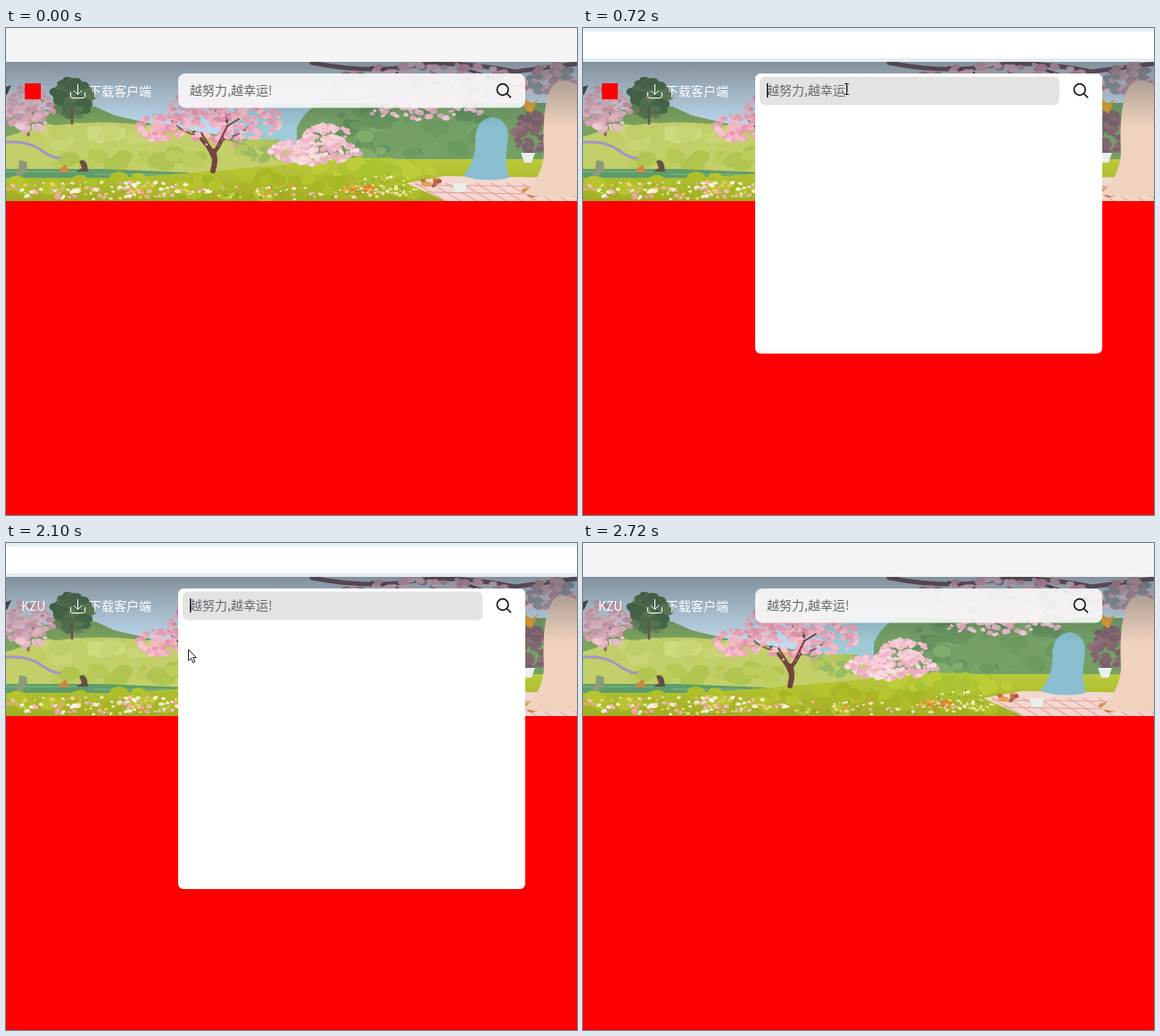
These frames come from a looping animation (640x546 px, 3110 ms). An HTML page with a canvas:

```html
<!DOCTYPE html>
<html lang="zh">
<head>
<meta charset="utf-8">
<style>
html, body { margin: 0; width: 100%; height: 100%; overflow: hidden; background: #f00; }
canvas { display: block; }
</style>
</head>
<body>
<canvas id="stage" width="640" height="546"></canvas>
<script>
const LOOP = 3110;
const STEPS = [0, 60, 200, 320, 460, 580, 720, 840, 960, 1070, 1190, 1300, 1420, 1540,
  1650, 1760, 1880, 1990, 2100, 2220, 2330, 2450, 2560, 2720];
const FONT = '14px "Noto Sans CJK SC", "Noto Sans CJK", sans-serif';
const HINT = '越努力,越幸运!';
const stage = document.getElementById('stage').getContext('2d');
const banner = document.createElement('canvas');
banner.width = 640;
banner.height = 194;

let seed = 7;
function rnd() {
  seed = (seed * 16807) % 2147483647;
  return seed / 2147483647;
}

function fill(g, color, d) {
  g.fillStyle = color;
  g.fill(new Path2D(d));
}

function line(g, color, width, d) {
  g.strokeStyle = color;
  g.lineWidth = width;
  g.stroke(new Path2D(d));
}

function fade(g, y0, c0, y1, c1) {
  const f = g.createLinearGradient(0, y0, 0, y1);
  f.addColorStop(0, c0);
  f.addColorStop(1, c1);
  return f;
}

function paintBanner(g) {
  // Scatter n brush dabs inside an ellipse
  function dabs(n, x, y, rx, ry, size, ...colors) {
    for (let i = 0; i < n; i++) {
      const a = rnd() * Math.PI * 2, r = Math.sqrt(rnd()), s = size * (0.5 + rnd());
      g.fillStyle = colors[Math.floor(rnd() * colors.length)];
      g.beginPath();
      g.ellipse(x + Math.cos(a) * r * rx, y + Math.sin(a) * r * ry, s, s * 0.65, rnd() - 0.5, 0, 7);
      g.fill();
    }
  }
  g.lineCap = 'round';
  g.fillStyle = fade(g, 38, '#d0dfea', 110, '#bddaf0');
  g.fillRect(0, 38, 640, 156);

  // Hills and far trees
  fill(g, '#9fcad8', 'M255 84H350V145H255Z');
  fill(g, '#7ca35f', 'M0 100L40 92L100 88L122 98L170 109L330 134V165H0Z');
  fill(g, '#74a066', 'M326 112Q335 92 352 84H640V160H326Z');
  dabs(45, 445, 118, 110, 28, 9, '#6b9a5f', '#77a468', '#80ac6e', '#649260');
  dabs(14, 408, 104, 26, 14, 8, '#5f8d58', '#699760');
  fill(g, '#c3cf68', 'M0 122Q55 104 122 106Q205 111 262 130L420 150V172H0Z');
  dabs(22, 95, 122, 75, 9, 10, '#c9d474', '#cfd97e', '#c1cd67');
  dabs(22, 125, 147, 110, 7, 10, '#b7c955', '#bdcd5b', '#b0c450');
  dabs(18, 285, 138, 28, 10, 7, '#a9c35d', '#9bbb62', '#b4c85e');
  line(g, '#a394c7', 3, 'M0 128Q24 126 38 136T60 146');

  // Left trees
  dabs(75, 74, 80, 21, 22, 6, '#55764f', '#607f52', '#4b6e4b', '#69885a');
  line(g, '#675d4b', 3, 'M74 90V107');
  line(g, '#836569', 3, 'M25 120Q24 106 32 92');
  dabs(120, 25, 92, 27, 25, 4, '#dcb0bd', '#e7bcc7', '#dfaabb', '#cd9fae', '#efcbd2');
  fill(g, '#465052', 'M0 66L6 64L1 75H0Z');

  // Lake and meadow
  fill(g, '#5d9d6a', 'M0 158H105L205 162V170H0Z');
  line(g, '#85b58a', 1, 'M0 161H78M98 164H180');
  g.fillStyle = fade(g, 146, '#bccb3c', 194, '#a0ad22');
  g.fill(new Path2D('M0 168H115Q220 163 310 153T440 147H640V194H0Z'));
  dabs(60, 290, 176, 290, 12, 8, '#aebf2a', '#b6c52e', '#a7b726');
  dabs(25, 420, 157, 70, 7, 9, '#b3c934', '#aac431', '#bccd38');

  // Blossom trees
  line(g, '#734440', 6, 'M232 160Q236 147 232 138');
  line(g, '#734440', 4, 'M232 145Q228 132 211 117M232 141Q246 126 248 98');
  line(g, '#85504f', 2, 'M216 121Q196 117 185 103M239 127Q261 121 278 106M246 111L234 91');
  for (const [x, y, rx, ry, n] of [[214, 91, 34, 22, 110], [175, 111, 29, 16, 95],
    [270, 104, 40, 20, 125], [236, 124, 40, 8, 26]])
    dabs(n, x, y, rx, ry, 3.2, '#f0a6bc', '#f5b8c8', '#e597ae', '#f6c4d0');
  line(g, '#734440', 2, 'M232 138L219 118M235 136L248 110L261 102');
  dabs(190, 346, 138, 50, 14, 3.2, '#f3bbca', '#f7cdd7', '#ecaec0', '#f9dde1');
  dabs(65, 360, 119, 25, 11, 3.2, '#f5bfcd', '#f7d0d9', '#efb3c4');
  line(g, '#785c66', 5, 'M343 39Q404 51 452 43T570 49L640 40');
  line(g, '#684f5a', 3, 'M410 44L485 62M515 46L574 66');
  dabs(170, 476, 64, 112, 24, 5, '#efb5c7', '#f4c4d1', '#e4a3b9', '#f6d3db', '#c08d9e');
  dabs(60, 470, 94, 62, 9, 3.2, '#f2c3d0', '#f6d5dd', '#e9b0c2');
  dabs(55, 612, 58, 30, 18, 5, '#c99aaa', '#dfb0be', '#9aa3aa');
  dabs(55, 592, 118, 24, 23, 5, '#83666f', '#79616a', '#906f7a');

  // Flowers
  dabs(150, 108, 182, 120, 10, 2.2, '#fff0dc', '#f4b8bd', '#eda0a0', '#f2cf6a', '#e8efd0');
  dabs(90, 320, 184, 105, 8, 1.8, '#fff8df', '#f0943c', '#f7dfad', '#e9b5a5', '#8aa42b');
  dabs(70, 427, 177, 36, 13, 1.6, '#fffbe6', '#e9edbd', '#8fac35', '#f1e68b');
  dabs(24, 394, 181, 20, 6, 2, '#ef8b2d', '#f5aa47', '#e87836');

  // Small distant figures
  fill(g, '#8b9a78', 'M15 148L23 150L24 158L18 166H9L14 157Z');
  fill(g, '#655044', 'M82 149Q89 146 91 154L92 161H79L85 157Z');
  fill(g, '#c98747', 'M60 158L67 153L71 162H59Z');

  // Picnic
  fill(g, '#f3d8cf', 'M449 174L492 166L640 168V194H493Z');
  for (let i = 0; i < 12; i++)
    line(g, '#e6a3a3', 1.2, `M${459 + i * 17} 174l34 20`);
  line(g, '#e2a0a0', 1.2, 'M459 176L640 178M472 184L640 187');
  dabs(16, 478, 173, 14, 4, 3, '#c36a45', '#e5a05c', '#a65a42');
  dabs(12, 587, 184, 10, 4, 3, '#d59956', '#bd7043');
  fill(g, '#e9f0ed', 'M500 174H517L514 184H503ZM577 140H593L589 151H581Z');
  fill(g, '#8abed0', 'M512 166Q528 148 526 122Q529 100 547 100Q566 104 562 130Q558 150 564 168Q538 174 512 166Z');
  fill(g, '#f0d3be', 'M580 186Q602 166 603 140Q600 84 613 64Q624 54 640 64V188Q606 192 580 186Z');
  fill(g, '#e5a332', 'M589 85L578 77L582 91L589 96L596 80Z');

  g.fillStyle = fade(g, 38, 'rgba(25,37,49,.42)', 112, 'rgba(25,37,49,0)');
  g.fillRect(0, 38, 640, 74);
}

// Linear value along [time, value] keys
function at(t, keys) {
  for (let i = 1; i < keys.length; i++) {
    const [t0, a] = keys[i - 1], [t1, b] = keys[i];
    if (t < t1) return a + (b - a) * Math.max(0, (t - t0) / (t1 - t0));
  }
  return keys[keys.length - 1][1];
}

function box(color, x, y, w, h, r) {
  stage.fillStyle = color;
  stage.beginPath();
  stage.roundRect(x, y, w, h, r);
  stage.fill();
}

function text(s, x, y, color) {
  stage.font = FONT;
  stage.fillStyle = color;
  stage.fillText(s, x, y);
}

function drawBar(active, hover) {
  box(active ? '#fff' : hover ? '#fcfcfc' : '#f4f4f4', 0, 0, 640, 38, 0);
  if (active) {
    box('#e7f0f7', 0, 0, 640, 4, 0);
    box('#e5edf2', 0, 34, 640, 4, 0);
  }
}

function drawNav(t) {
  stage.save();
  stage.beginPath();
  stage.rect(0, 50, 66, 42);
  stage.clip();
  const lift = at(t, [[1420, 0], [1540, 7], [1760, 34]]);
  if (t < 1760) box('#f00', 21, 62 - lift, 18, 18, 0);
  if (t >= 1650) text('KZU', 17, 76 + at(t, [[1650, 14], [1760, 4], [1880, 0]]), '#fff');
  stage.restore();
  line(stage, '#fff', 1, 'M72.5 72V76Q72.5 78.5 75 78.5H86Q88.5 78.5 88.5 76V72M80.5 63V74M76 70L80.5 74.5L85 70');
  text('下载客户端', 93, 76, '#fff');
}

function drawSearch(t, hover, open) {
  const height = at(t, [[460, 38], [580, 174], [720, 314], [840, 337], [2330, 337], [2450, 233], [2560, 99]]);
  const closing = t >= 2450 && t < 2720;
  if (open) box('#fff', 193, 51, 389, height, 6);
  else if (closing) {
    box('rgba(236,237,238,.93)', 193, 51, 389, 37, [8, 8, 0, 0]);
    box('#fff', 193, 88, 389, height - 37, [0, 0, 6, 6]);
  } else box(hover ? '#fcfcfc' : 'rgba(250,250,250,.9)', 193, 51, 389, 38.5, 8);

  if (open) box('#e3e3e3', 198, 54.5, 336, 32, 6);
  const typed = t < 960 || t >= 1760 ? '' : '加油!'.slice(0, t < 1070 ? 1 : t < 1190 ? 2 : 3);
  text(typed || HINT, 206, 75, typed ? '#18191c' : '#646970');
  if (open && (t < 1420 || t >= 1760))
    box('#111', 206 + stage.measureText(typed).width, 62, 1.4, 16, 0);
  if (typed) {
    box('#606164', 511, 64, 14.5, 14.5, 7.25);
    line(stage, '#fff', 1.3, 'M515.8 68.8L520.8 73.8M520.8 68.8L515.8 73.8');
  }
  line(stage, '#18191c', 1.7, 'M563 69a6.3 6.3 0 1 1-12.6 0a6.3 6.3 0 1 1 12.6 0M561.3 73.5L566 78.2');
}

function drawPointer(t) {
  if (t < 200 || t >= 2720) return;
  const x = at(t, [[200, 262], [320, 284], [460, 295], [1190, 295], [1300, 370], [1420, 475], [1540, 525],
    [1650, 519], [1760, 519], [1880, 450], [2100, 204], [2330, 136], [2450, 133], [2560, 127]]);
  const y = at(t, [[200, 82], [320, 74], [460, 69], [1190, 69], [1540, 78], [1650, 73], [1760, 73],
    [2100, 119], [2330, 145], [2450, 147], [2560, 151]]);
  stage.save();
  stage.translate(x, y);
  if (t < 1420) line(stage, '#222', 1, 'M-2 -6.5H3M.5 -6.5V5.5M-2 5.5H3');
  else {
    const arrow = 'M.5 .5V13L3.5 10.2L5.6 15L7.8 14L5.7 9.5H9.3Z';
    fill(stage, '#fff', arrow);
    line(stage, '#222', 1, arrow);
  }
  stage.restore();
}

function draw(now) {
  const ms = now % LOOP;
  const t = STEPS.filter(s => s <= ms).pop();
  const hover = t >= 200 && t < 2450;
  const open = t >= 580 && t < 2450;
  box('#f00', 0, 0, 640, 546, 0);
  stage.drawImage(banner, 0, 0);
  drawBar(t >= 720 && t < 2720, hover);
  drawNav(t);
  drawSearch(t, hover, open);
  drawPointer(t);
  requestAnimationFrame(() => draw(performance.now() - start));
}

paintBanner(banner.getContext('2d'));
const start = performance.now();
draw(0);
</script>
</body>
</html>
```
